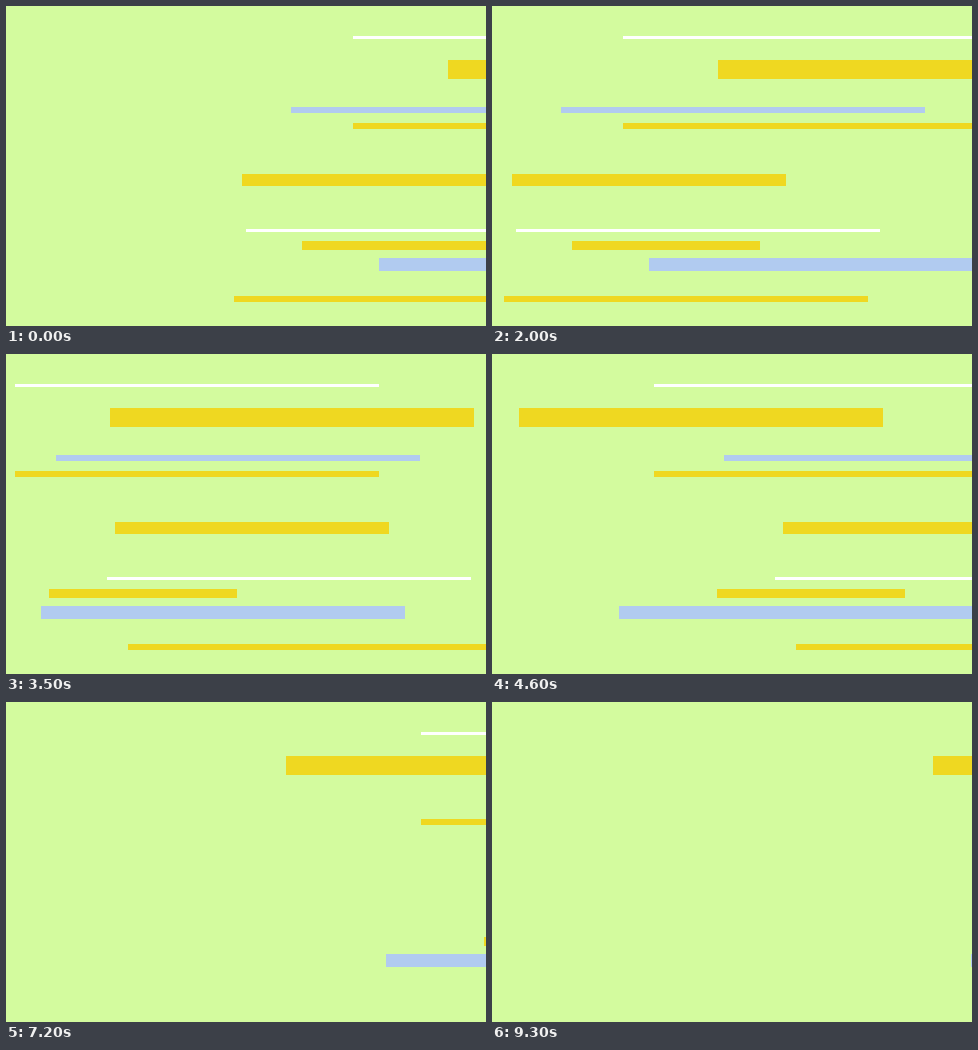
These frames come from a looping animation (480 by 320 pixels, 9.4 s). An HTML page with a canvas:

```html
<!DOCTYPE html>
<html lang="en">
<head>
<meta charset="utf-8">
<title>Sliding bars</title>
<style>
  html, body { margin: 0; width: 100%; height: 100%; overflow: hidden; background: #d3fb9e; }
  canvas { display: block; }
</style>
</head>
<body>
<canvas id="stage" width="480" height="320"></canvas>
<script>
const LOOP = 9400, STEP = 100, W = 480, H = 320;
const BG = '#d3fb9e', WHITE = '#ffffff', GOLD = '#efd821', BLUE = '#b1cbf0';

// x: start, low: where the bar turns back, stop: where it comes to rest
const bar = (x, low, y, h, color, w = 364, stop = Infinity) => ({ x, low, y, h, color, w, stop });
const bars = [
  bar(347, -5.5, 30, 3, WHITE),
  bar(442, -25.5, 54, 19, GOLD),
  bar(285, -1.5, 101, 6, BLUE),
  bar(347, -5.5, 117, 6, GOLD),
  bar(236, 3.5, 168, 12, GOLD, 274),
  bar(240, 1.5, 223, 3, WHITE),
  bar(296, 0.5, 235, 9, GOLD, 188),
  bar(373, -10, 252, 13, BLUE, 364, W - 1),
  bar(228, 6, 290, 6, GOLD)
];

// distance every bar has travelled: [step, pixels]
const pace = [
  [0, 0], [10, 98], [20, 216], [35, 338], [41, 422], [42, 467], [46, 520],
  [60, 651], [62, 668], [63, 668], [72, 773], [83, 872], [93, 934]
];

function travel(step) {
  const i = Math.max(1, pace.findIndex(([s]) => s >= step));
  const [s0, d0] = pace[i - 1], [s1, d1] = pace[i];
  return d0 + (d1 - d0) * (step - s0) / (s1 - s0);
}

const ctx = document.getElementById('stage').getContext('2d');

function draw(step) {
  const d = travel(step);
  ctx.fillStyle = BG;
  ctx.fillRect(0, 0, W, H);
  for (const { x, low, y, h, color, w, stop } of bars) {
    const left = Math.round(low + Math.abs(x - low - d));
    ctx.fillStyle = color;
    ctx.fillRect(Math.min(left, stop), y, w, h);
  }
}

const start = performance.now();
function tick() {
  draw(Math.floor((performance.now() - start) % LOOP / STEP));
  requestAnimationFrame(tick);
}
tick();
</script>
</body>
</html>
```
